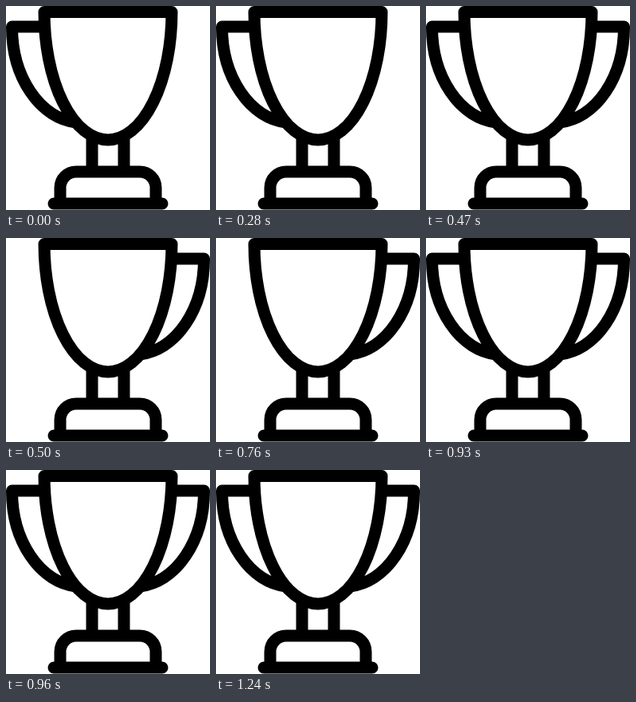
Recreate the animation shown at these times as an HTML page. Size 256 by 256 pixels, loop 1.43 s.

```html
<!DOCTYPE html>
<html lang="en">
<head>
<meta charset="utf-8">
<title>Trophy</title>
<style>
  html, body { margin: 0; width: 100%; height: 100%; overflow: hidden; background: #fff; }
  svg { display: block; width: 100%; height: 100%; }
  path { fill: none; stroke: #000; stroke-width: 15; stroke-linejoin: round; }
</style>
</head>
<body>
<svg viewBox="0 0 256 256">
  <defs>
    <path id="handle" d="M48 26H7.5A87.5 120 0 0 0 88 146"/>
  </defs>
  <use id="left" href="#handle"/>
  <use id="right" href="#handle" transform="matrix(-1 0 0 1 256 0)"/>
  <path d="M48 7.5H208A80 160.5 0 0 1 48 7.5Z"/>
  <path d="M108 164V208M148 164V208"/>
  <path d="M68 248V228a20 20 0 0 1 20-20H168a20 20 0 0 1 20 20V248"/>
  <path d="M60 248H196" stroke-linecap="round"/>
</svg>
<script>
  const LOOP = 1430;
  // Time spans (ms) in which each handle is hidden
  const hidden = { left: [500, 930], right: [0, 470] };
  const start = performance.now();

  function draw() {
    const t = (performance.now() - start) % LOOP;
    for (const [id, [from, to]] of Object.entries(hidden)) {
      const off = t >= from && t < to;
      document.getElementById(id).style.visibility = off ? "hidden" : "visible";
    }
    requestAnimationFrame(draw);
  }
  draw();
</script>
</body>
</html>
```
